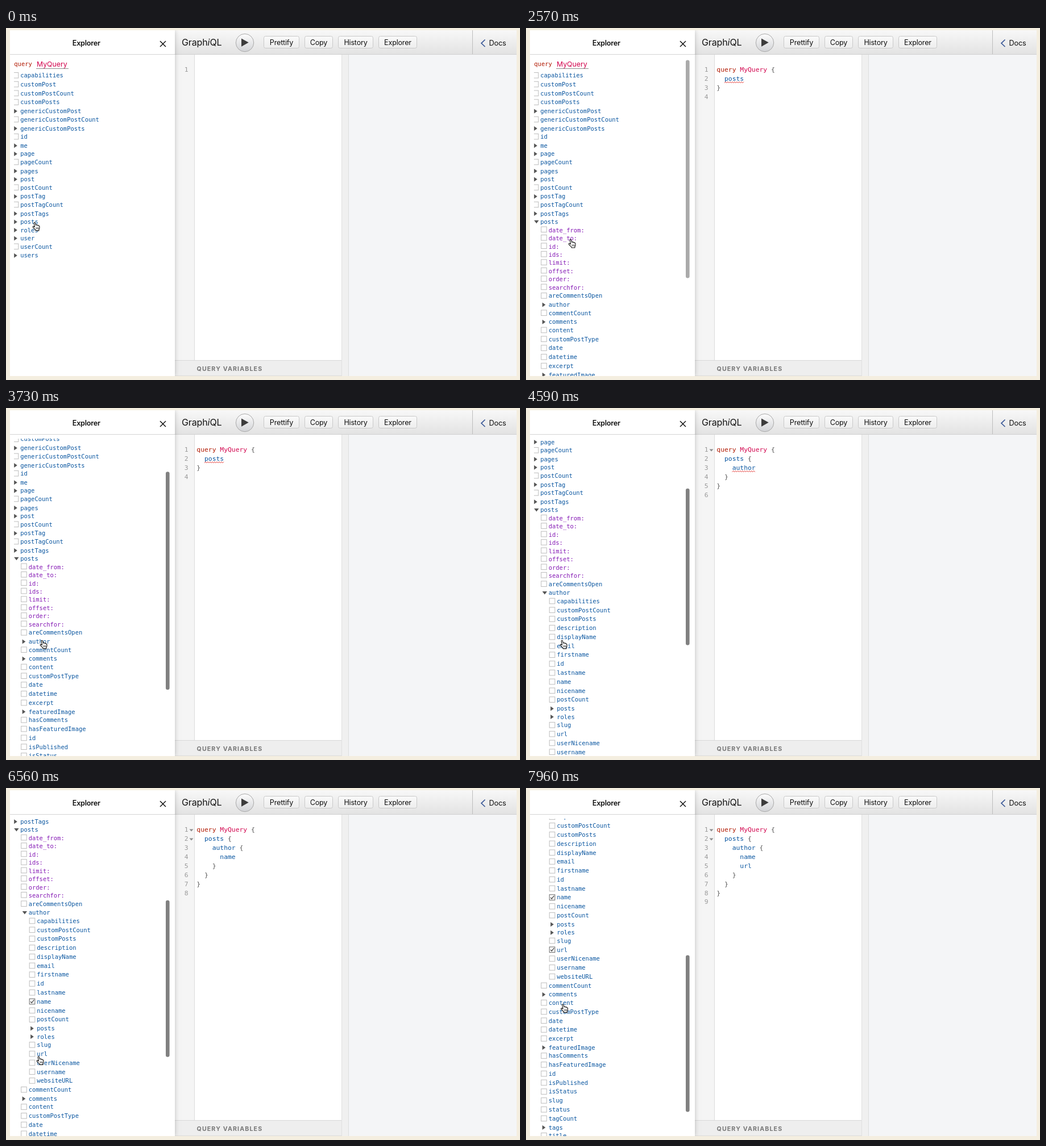
Animation of 904x620 px, one loop 8 s. Source, as an HTML page with a canvas:

```html
<!DOCTYPE html>
<html lang="en">
<head>
<meta charset="utf-8">
<title>GraphiQL Explorer</title>
<style>
html, body { margin: 0; width: 100%; height: 100%; overflow: hidden; background: #f4eee0; }
canvas { display: block; }
</style>
</head>
<body>
<canvas id="stage" width="904" height="620"></canvas>
<script>
const ctx = document.getElementById('stage').getContext('2d');
const LOOP = 8000;
const SANS = 'Inter, "Open Sans", sans-serif';
const MONO = '"DejaVu Sans Mono", monospace';
const BLUE = '#0a56a0', PURPLE = '#8519b5', RED = '#b11a04', PINK = '#d2054e';

// Moments at which the screen refreshes: [first, last, steps]
const RUNS = [[0], [630], [1730], [2090], [2450, 2750, 4], [3230, 3730, 6], [4120], [4450],
  [4590, 5300, 8], [5720], [5960, 6320, 4], [6470, 6560, 2], [7010], [7190, 7960, 8]];
const TICKS = RUNS.flatMap(([a, b, n = 1]) =>
  Array.from({ length: n }, (_, i) => n > 1 ? a + (b - a) * i / (n - 1) : a));

const CLICKS = [2090, 4120, 5720, 7010];
const LINT_DELAY = 420;

const SCROLL = [[2750, 0], [3230, 41.7], [3430, 62], [3730, 76], [4120, 76], [4450, 112], [4590, 161.7],
  [4890, 194], [5300, 215.1], [5720, 215.1], [5960, 226], [6200, 259], [6320, 267.7],
  [7010, 267.7], [7190, 286], [7630, 408], [7960, 451.1]];
const HAND_X = [[2090, 53], [2450, 66], [2750, 111], [3230, 111], [3730, 66], [4590, 66], [5300, 67.5],
  [5720, 67.5], [6320, 66], [6470, 63], [6560, 60], [7190, 60], [7960, 67.5]];
const HAND_Y = [[2090, 349.5], [2450, 364], [2750, 411], [3230, 411], [3730, 416.5], [4590, 416.5],
  [5300, 433], [5720, 433], [6320, 458], [6470, 468], [6560, 480], [7190, 480], [7960, 388]];

// ">" marks an expandable field, ":" an argument
const ROOT = ('capabilities customPost customPostCount customPosts >genericCustomPost ' +
  'genericCustomPostCount >genericCustomPosts id >me >page pageCount >pages >post postCount ' +
  '>postTag postTagCount >postTags >posts >roles >user userCount >users').split(' ');
const POSTS = ('date_from: date_to: id: ids: limit: offset: order: searchfor: areCommentsOpen >author ' +
  'commentCount >comments content customPostType date datetime excerpt >featuredImage hasComments ' +
  'hasFeaturedImage id isPublished isStatus slug status tagCount >tags title url').split(' ');
const AUTHOR = ('capabilities customPostCount customPosts description displayName email firstname id ' +
  'lastname name nicename postCount >posts >roles slug url userNicename username websiteURL').split(' ');

const CODE = [
  [''],
  ['query MyQuery {', '  posts', '}', ''],
  ['query MyQuery {', '  posts {', '    author', '  }', '}', ''],
  ['query MyQuery {', '  posts {', '    author {', '      name', '    }', '  }', '}', ''],
  ['query MyQuery {', '  posts {', '    author {', '      name', '      url', '    }', '  }', '}', '']
];
const FOLDS = [0, 0, 1, 2, 2];
const ERRORS = ['', 'posts', 'author', '', ''];

function at(keys, t) {
  if (t <= keys[0][0]) return keys[0][1];
  for (let i = 1; i < keys.length; i++) {
    const [t0, a] = keys[i - 1], [t1, b] = keys[i];
    if (t <= t1) return a + (b - a) * (t - t0) / (t1 - t0);
  }
  return keys[keys.length - 1][1];
}

function rect(x, y, w, h, fill) {
  ctx.fillStyle = fill;
  ctx.fillRect(x, y, w, h);
}

function text(s, x, y, font, fill, spacing = 0, align = 'left') {
  ctx.font = font;
  ctx.fillStyle = fill;
  ctx.letterSpacing = spacing + 'px';
  ctx.textAlign = align;
  ctx.fillText(s, x, y);
  ctx.letterSpacing = '0px';
}

function poly(points, fill) {
  ctx.beginPath();
  points.forEach(([x, y]) => ctx.lineTo(x, y));
  ctx.closePath();
  ctx.fillStyle = fill;
  ctx.fill();
}

function line(points, stroke, width = 1) {
  ctx.beginPath();
  points.forEach(([x, y]) => ctx.lineTo(x, y));
  ctx.strokeStyle = stroke;
  ctx.lineWidth = width;
  ctx.stroke();
}

function round(x, y, w, h, r, fill, stroke) {
  ctx.beginPath();
  ctx.roundRect(x, y, w, h, r);
  ctx.fillStyle = fill;
  ctx.fill();
  if (stroke) {
    ctx.strokeStyle = stroke;
    ctx.lineWidth = 1;
    ctx.stroke();
  }
}

function shade(x0, y0, x1, y1, from, to) {
  const g = ctx.createLinearGradient(x0, y0, x1, y1);
  g.addColorStop(0, from);
  g.addColorStop(1, to);
  return g;
}

function button(label, x, w) {
  round(x + .5, 14.5, w - 1, 21, 3, shade(0, 14, 0, 36, '#fafafa', '#ededed'), '#c9c9c9');
  text(label, x + w / 2, 29.5, '12.6px ' + SANS, '#111', -.2, 'center');
}

function drawToolbar() {
  rect(297, 4, 601, 42, shade(0, 4, 0, 46, '#f8f8f8', '#e3e3e3'));
  rect(297, 46, 601, 1, '#d0d0d0');
  const font = '16px ' + SANS;
  text('Graph', 309, 31.3, font, '#141414', -.15);
  let x = 309 + ctx.measureText('Graph').width - .7;
  text('i', x, 31.3, 'italic ' + font, '#141414');
  x += ctx.measureText('i').width;
  text('QL', x, 31.3, font, '#141414', -.15);

  ctx.beginPath();
  ctx.arc(420, 26, 15.7, 0, Math.PI * 2);
  ctx.fillStyle = shade(0, 10, 0, 42, '#fdfdfd', '#d2d3d6');
  ctx.fill();
  ctx.strokeStyle = '#a9a9a9';
  ctx.lineWidth = 1;
  ctx.stroke();
  poly([[414, 18.5], [426.7, 25.6], [414, 32.8]], '#3c3c3c');

  button('Prettify', 453, 63);
  button('Copy', 525, 50);
  button('History', 584, 62);
  button('Explorer', 655, 68);

  rect(820, 4, 1, 42, '#bdbdbd');
  line([[842.5, 20.5], [836, 26.8], [842.5, 33]], '#3b5998', 1.7);
  text('Docs', 849.5, 31, '12.8px ' + SANS, '#111', -.2);
}

function drawPanes() {
  rect(0, 0, 904, 620, '#f4eee0');
  rect(297, 47, 35, 566, '#f5f5f5');
  rect(331, 47, 1, 539, '#dcdcdc');
  rect(332, 47, 258, 539, '#fff');
  rect(590, 47, 13, 566, '#f0f0f0');
  rect(590, 47, 1, 566, '#e0e0e0');
  rect(602, 47, 1, 566, '#dedede');
  rect(603, 47, 295, 566, '#f4f5f7');
  rect(297, 585, 293, 28, '#eee');
  rect(297, 585, 293, 1, '#d8d8d8');
  rect(297, 612, 293, 1, '#dcdcdc');
  text('QUERY VARIABLES', 335.5, 603.7, 'bold 10.6px ' + SANS, '#777', 1.15);
}

function squiggle(x, y, w) {
  const pts = [];
  for (let i = 0; i <= w / 2; i++) pts.push([x + i * 2, y + (i % 2 ? -1 : 1)]);
  line(pts, '#e3302c', 1);
}

function drawCode(state, settled) {
  const font = '11.37px ' + MONO;
  ctx.font = font;
  const adv = ctx.measureText('0').width;
  CODE[state].forEach((src, i) => {
    const c = 73 + i * 15.93;
    text(String(i + 1), 320.5, c + 4, font, '#999', 0, 'right');
    if (settled && i < FOLDS[state]) poly([[322.5, c - .5], [329.5, c - .5], [326, c + 3.5]], '#8c8c8c');
    for (const m of src.matchAll(/\S+/g)) {
      const word = m[0], x = 335.3 + m.index * adv;
      const color = word === 'query' ? RED : word === 'MyQuery' ? PINK : /[{}]/.test(word) ? '#555' : BLUE;
      text(word, x, c + 4, font, color);
      if (settled && word === ERRORS[state]) squiggle(x, c + 6.8, word.length * adv);
    }
  });
}

function checkbox(x, c, checked) {
  ctx.strokeStyle = checked ? '#666' : '#bdbdbd';
  ctx.lineWidth = 1;
  ctx.strokeRect(x, c - 5, 9.6, 9.6);
  if (checked) line([[x + 2, c], [x + 4, c + 2.3], [x + 8, c - 3]], '#444', 1.3);
}

function drawRows(names, y, depth, state) {
  const x = 25.2 + depth * 14.5;
  for (const item of names) {
    const folder = item[0] === '>', arg = item.endsWith(':');
    const name = folder ? item.slice(1) : item;
    const open = folder && (depth === 0 && name === 'posts' && state > 0 ||
      depth === 1 && name === 'author' && state > 1);
    if (open) poly([[x - 11, y - 2.7], [x - 2.6, y - 2.7], [x - 6.8, y + 2.8]], '#555');
    else if (folder) poly([[x - 11, y - 4], [x - 5.4, y], [x - 11, y + 4]], '#555');
    else {
      const checked = depth === 2 && (name === 'name' && state > 2 || name === 'url' && state > 3);
      checkbox(x - 13, arg ? y - 1 : y, checked);
    }
    text(name, x, y + 3.6, '10.47px ' + MONO, arg ? PURPLE : BLUE);
    y += folder ? 14.5 : arg ? 14.45 : 15.78;
    if (open) y = drawRows(depth ? AUTHOR : POSTS, y, depth + 1, state);
  }
  return y;
}

function drawExplorer(t, state) {
  const scroll = at(SCROLL, t);
  ctx.save();
  ctx.shadowColor = 'rgba(0,0,0,.22)';
  ctx.shadowBlur = 8;
  ctx.beginPath();
  ctx.rect(297, 4, 12, 609);
  ctx.clip();
  rect(7, 4, 290, 609, '#fff');
  ctx.restore();
  rect(7, 4, 290, 609, '#fff');
  rect(7, 46, 290, 1, '#d4d4d4');
  text('Explorer', 141.3, 31.4, '600 12.6px ' + SANS, '#111', -.2, 'center');
  line([[271, 23], [281, 33]], '#111', 1.5);
  line([[281, 23], [271, 33]], '#111', 1.5);

  ctx.save();
  ctx.beginPath();
  ctx.rect(14, 54, 282, 559);
  ctx.clip();
  text('query', 14.3, 67.3 - scroll, '10.47px ' + MONO, RED);
  text('MyQuery', 54, 67.8 - scroll, '12.3px ' + SANS, PINK);
  rect(53, 71 - scroll, 57, 1, '#8d8d8d');
  drawRows(ROOT, 83.5 - scroll, 0, state);
  ctx.restore();

  const shown = t < 2090 ? 0 : t < 3230 ? at([[2450, 1], [2750, 0]], t) : 1;
  if (shown) {
    const thumb = state > 1 ? 276 : 384;
    ctx.globalAlpha = shown;
    round(281, 56.5 + scroll * thumb / 523, 6.6, thumb, 3.3, '#808080');
    ctx.globalAlpha = 1;
  }
}

function drawHand(x, y) {
  ctx.save();
  ctx.translate(x - 6.5, y - 8);
  ctx.lineJoin = 'round';
  ctx.fillStyle = '#fff';
  ctx.strokeStyle = '#111';
  ctx.lineWidth = 1.1;
  ctx.stroke(new Path2D());
  const hand = new Path2D('M4 9.2L2.7 2.3Q2.5 .9 3.6 .7Q4.7 .6 5 1.8L6 5.8Q6.3 4.8 7.3 5Q8.3 5.1 8.5 6.2' +
    'Q9 5.3 9.9 5.7Q10.6 6 10.7 7Q11.4 6.4 12 7.1Q12.6 8 12.5 10Q12.4 12 11.4 13.4L11.4 15.4L5.6 15.4' +
    'L5.4 14Q3.2 12 1 9.6Q.3 8.4 1.2 7.9Q2.2 7.6 4 9.2Z');
  ctx.fill(hand);
  ctx.stroke(hand);
  ctx.lineWidth = .8;
  ctx.stroke(new Path2D('M6.7 9.7V12.7M8.6 9.7V12.7M10.4 9.7V12.7'));
  ctx.restore();
}

function drawTip() {
  round(51.5, 360.5, 32, 18, 1, '#efefef', '#cacaca');
  text('Posts', 67.5, 373, '10px ' + SANS, '#222', 0, 'center');
}

function draw(now) {
  const clock = now % LOOP;
  const t = TICKS.reduce((last, tick) => tick <= clock ? tick : last, 0);
  const state = CLICKS.filter(c => t >= c).length;
  const settled = state > 0 && t - CLICKS[state - 1] >= LINT_DELAY;
  drawPanes();
  drawCode(state, settled);
  drawToolbar();
  drawExplorer(t, state);
  if (t >= 630 && t < 1730) drawTip();
  drawHand(at(HAND_X, t), at(HAND_Y, t));
}

let start;
function loop(now) {
  start ??= now;
  draw(Math.max(0, now - start));
  requestAnimationFrame(loop);
}
draw(0);
requestAnimationFrame(loop);
</script>
</body>
</html>
```
